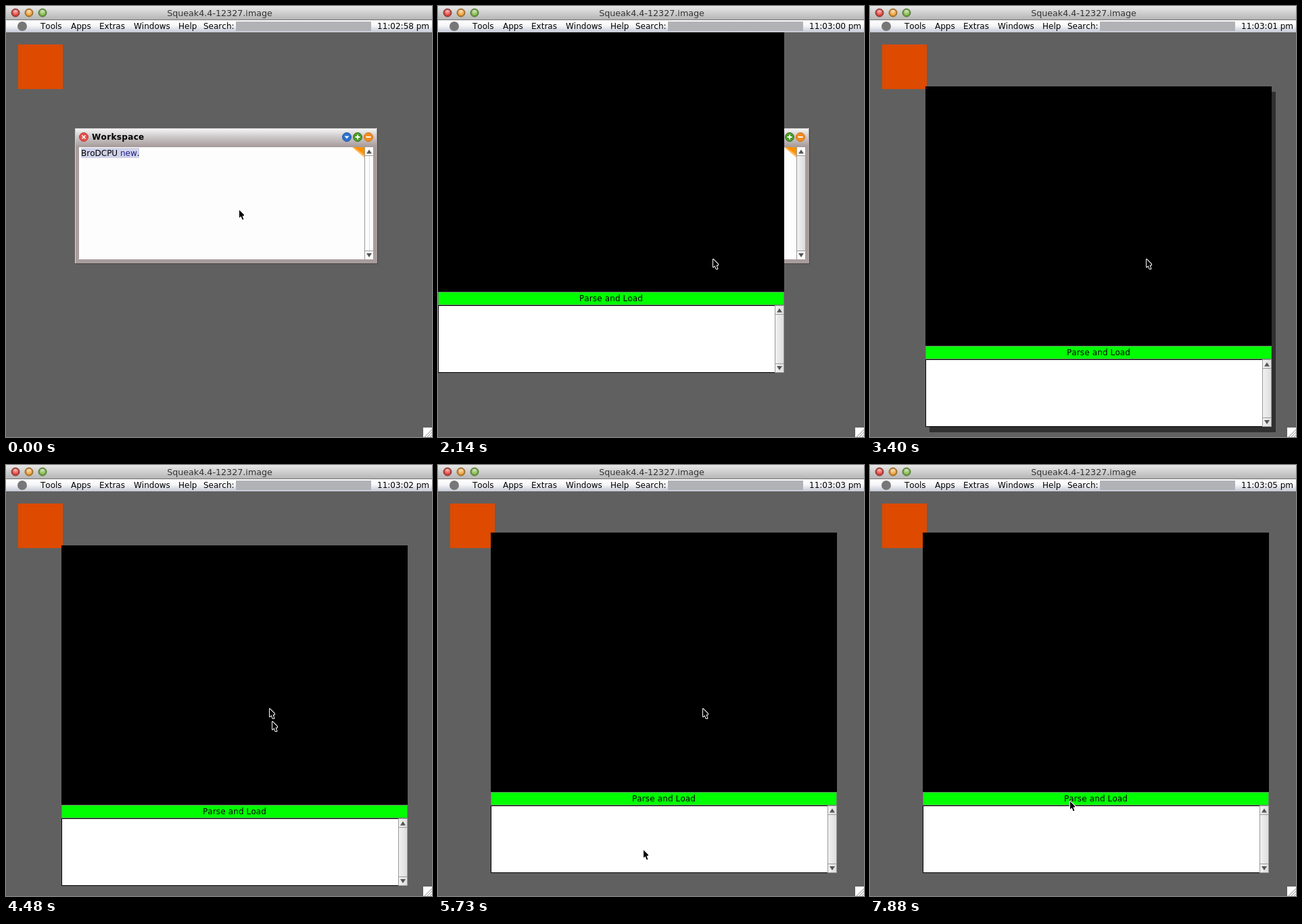
These frames come from a looping animation (630 px wide and 638 px high, 8 s). An HTML page:

```html
<!DOCTYPE html>
<html lang="en">
<head>
<meta charset="utf-8">
<title>Workspace</title>
<style>
html, body { margin: 0; width: 100%; height: 100%; overflow: hidden; background: #606060; }
svg { display: block; }
text { font: 12px "DejaVu Sans", sans-serif; font-kerning: none; white-space: pre; }
.title { font-size: 12.7px; text-anchor: middle; fill: #333; }
.bold { font-weight: bold; letter-spacing: .35px; }
.label { text-anchor: middle; letter-spacing: .13px; }

.panel, .shadow, .caret, .cursor, .ghost, .halo, .clock, .track {
  animation: 8s step-end infinite;
}
.panel { animation-name: panel; }
.shadow { animation-name: shadow; }
.caret { animation-name: caret; }
.cursor { animation-name: cursor; }
.ghost { animation-name: ghost; }
.halo { animation-name: halo; }
.clock { animation-name: clock; }
.track { animation-name: track; }

@keyframes panel {
  0% { transform: translate(-700px, 39px); }
  8.875% { transform: translate(0, 39px); }
  42.5% { transform: translate(82px, 119px); }
  71.625%, 100% { transform: translate(78px, 100px); }
}
@keyframes shadow {
  0%, 53.75%, 71.625%, 100% { opacity: 0; }
  35.75%, 67.25% { opacity: .5; }
}
@keyframes caret {
  0%, 94%, 100% { opacity: 0; }
  87.375% { opacity: 1; }
}
@keyframes cursor {
  0% { transform: translate(344px, 301px); }
  13.375% { transform: translate(335px, 308px); }
  15.625% { transform: translate(324px, 294px); }
  26.75% { transform: translate(406px, 374px); }
  31.25%, 62.75% { transform: translate(-30px, 0); }
  33.5% { transform: translate(326px, 294px); }
  42.5% { transform: translate(408px, 374px); }
  56% { transform: translate(393px, 379px); }
  60.5% { transform: translate(397px, 464px); }
  65% { transform: translate(395px, 379px); }
  71.625% { transform: translate(303px, 569px); }
  78.375% { transform: translate(292px, 563px); }
  89.625% { transform: translate(292px, 561px); }
  91.75% { transform: translate(295px, 525px); }
  94% { transform: translate(292px, 501px); }
  96.25%, 100% { transform: translate(295px, 497px); }
}
@keyframes ghost {
  0%, 60.5%, 73.875%, 100% { transform: translate(-30px, 0); }
  56% { transform: translate(389px, 360px); }
  71.625% { transform: translate(391px, 360px); }
}
@keyframes halo {
  0%, 98.5%, 100% { opacity: 1; }
  94% { opacity: 0; }
}
@keyframes clock {
  0% { transform: translateY(0); }
  13.375% { transform: translateY(-20px); }
  26.75% { transform: translateY(-40px); }
  42.5% { transform: translateY(-60px); }
  53.75% { transform: translateY(-80px); }
  67.25% { transform: translateY(-100px); }
  80.625% { transform: translateY(-120px); }
  94%, 100% { transform: translateY(-140px); }
}
@keyframes track {
  0%, 100% { opacity: 0; }
  26.75% { opacity: 1; }
}
</style>
</head>
<body>
<svg width="630" height="638" viewBox="0 0 630 638">
  <defs>
    <linearGradient id="chrome" x2="0" y2="1">
      <stop stop-color="#e8e8e8"/><stop offset="1" stop-color="#b6b6b6"/>
    </linearGradient>
    <linearGradient id="menu" x2="0" y2="1">
      <stop stop-color="#fff"/><stop offset=".45" stop-color="#f6f6f8"/><stop offset="1" stop-color="#c3c8d4"/>
    </linearGradient>
    <linearGradient id="bar" x2="0" y2="1">
      <stop stop-color="#f4f4f4"/><stop offset=".45" stop-color="#cdc9c9"/><stop offset="1" stop-color="#a89c9c"/>
    </linearGradient>
    <linearGradient id="groove">
      <stop stop-color="#f2f2f2"/><stop offset="1" stop-color="#dcdcdc"/>
    </linearGradient>
    <linearGradient id="corner" x1="1" y1="0" x2=".5" y2=".6">
      <stop offset=".6" stop-color="#ff9100"/><stop offset="1" stop-color="#ffe0b0"/>
    </linearGradient>
    <radialGradient id="shine" cy=".25" r=".6">
      <stop stop-color="#fff" stop-opacity=".65"/><stop offset="1" stop-color="#fff" stop-opacity="0"/>
    </radialGradient>
    <path id="arrow" d="M1 1V12.5L3.6 10.2 5.4 15H7.4L5.5 9.4H8V8Z"/>
    <g id="light">
      <circle r="6"/><circle r="5" fill="url(#shine)"/>
    </g>
    <path id="up" d="M-4 3H4L0 -3Z" fill="#555"/>
    <path id="down" d="M-4 -3H4L0 3Z" fill="#555"/>
  </defs>

  <rect width="630" height="638" fill="#606060"/>
  <rect x="18" y="57" width="66" height="66" fill="#dd4a00"/>

  <g id="workspace">
    <rect x="102" y="181" width="448" height="201" fill="#454343"/>
    <rect x="102" y="181" width="447" height="200" fill="#a89c9c"/>
    <rect x="103" y="182" width="445" height="26" fill="url(#bar)"/>
    <path d="M102.5 381V181.5H549" fill="none" stroke="#d8d4d4"/>
    <g stroke-width="2" fill="none">
      <g transform="translate(115 194)">
        <circle r="6.5" fill="#e4504c" stroke="#b84240" stroke-width="1"/>
        <path d="M-2.5 -2.5 2.5 2.5M2.5 -2.5 -2.5 2.5" stroke="#fff" stroke-width="1.6"/>
      </g>
      <g transform="translate(504 194)">
        <circle r="6.5" fill="#2c72cc" stroke="#2458a0" stroke-width="1"/>
        <path d="M-3.5 -1.5H3.5L0 2.5Z" fill="#fff"/>
      </g>
      <g transform="translate(520 194)">
        <circle r="6.5" fill="#4c9a2a" stroke="#3b7322" stroke-width="1"/>
        <path d="M-3.5 0H3.5M0 -3.5V3.5" stroke="#fff"/>
      </g>
      <g transform="translate(536 194)">
        <circle r="6.5" fill="#f68b1f" stroke="#c87018" stroke-width="1"/>
        <path d="M-3.5 0H3.5" stroke="#fff"/>
      </g>
    </g>
    <text class="bold" x="127" y="198">Workspace</text>
    <rect x="108" y="209" width="435" height="166" fill="#fdfdfd"/>
    <rect x="111" y="210" width="86" height="15" fill="#d0d2ea"/>
    <text x="111" y="222">BroDCPU<tspan fill="#20208a"> new</tspan>.</text>
    <path d="M512 209H530V225Z" fill="url(#corner)"/>
    <path d="M537.5 222V362" stroke="#ddd"/>
    <rect class="track" x="531" y="222" width="12" height="140" fill="url(#groove)"/>
    <path d="M530.5 209V375M531 221.5H543M531 362.5H543" stroke="#999"/>
    <use href="#up" x="537" y="215.5"/>
    <use href="#down" x="537" y="369"/>
  </g>

  <g class="panel">
    <rect class="shadow" x="6" y="8" width="512" height="504"/>
    <rect width="512" height="384"/>
    <rect x=".5" y="384.5" width="511" height="19" fill="#0f0" stroke="#6a8a6a"/>
    <text class="label" x="256" y="398">Parse and Load</text>
    <rect x=".5" y="404.5" width="511" height="99" fill="#fff" stroke="#000"/>
    <rect class="caret" x="4" y="405" width="1" height="12"/>
    <rect x="498.5" y="404.5" width="13" height="99" fill="url(#groove)" stroke="#999"/>
    <path d="M499 417.5H511M499 490.5H511" stroke="#999"/>
    <use href="#up" x="505" y="411.5"/>
    <use href="#down" x="505" y="497"/>
  </g>

  <g id="menubar">
    <rect y="21" width="630" height="18" fill="url(#menu)"/>
    <circle cx="24" cy="30" r="7" fill="#777"/>
    <text x="51" y="34">Tools</text>
    <text x="96" y="34">Apps</text>
    <text x="138" y="34">Extras</text>
    <text x="189" y="34">Windows</text>
    <text x="255" y="34">Help</text>
    <text x="292" y="34">Search:</text>
    <rect x="340" y="23" width="200" height="14" fill="#b1b2b6"/>
    <svg x="545" y="21" width="85" height="18">
      <g class="clock">
        <text x="4" y="13">11:02:58 pm</text>
        <text x="4" y="33">11:02:59 pm</text>
        <text x="4" y="53">11:03:00 pm</text>
        <text x="4" y="73">11:03:01 pm</text>
        <text x="4" y="93">11:03:02 pm</text>
        <text x="4" y="113">11:03:03 pm</text>
        <text x="4" y="133">11:03:04 pm</text>
        <text x="4" y="153">11:03:05 pm</text>
      </g>
    </svg>
  </g>

  <g id="titlebar">
    <rect width="630" height="20" fill="url(#chrome)"/>
    <rect y="20" width="630" height="1" fill="#707070"/>
    <use href="#light" x="14" y="10" fill="#e2463f" stroke="#8e3a36"/>
    <use href="#light" x="34" y="10" fill="#f0a23a" stroke="#94682c"/>
    <use href="#light" x="54" y="10" fill="#84b94c" stroke="#557a36"/>
    <text class="title" x="316" y="15">Squeak4.4-12327.image</text>
  </g>

  <rect x="617" y="624" width="13" height="14" fill="#fff"/>
  <path d="M619 638 630 627M623 638 630 631M627 638 630 635" stroke="#8a8a8a"/>

  <g class="ghost">
    <use href="#arrow" stroke="#fff" stroke-width="2" stroke-linejoin="round"/>
    <use href="#arrow"/>
  </g>
  <g class="cursor">
    <use class="halo" href="#arrow" stroke="#fff" stroke-width="2" stroke-linejoin="round"/>
    <use href="#arrow"/>
  </g>
</svg>
</body>
</html>
```
